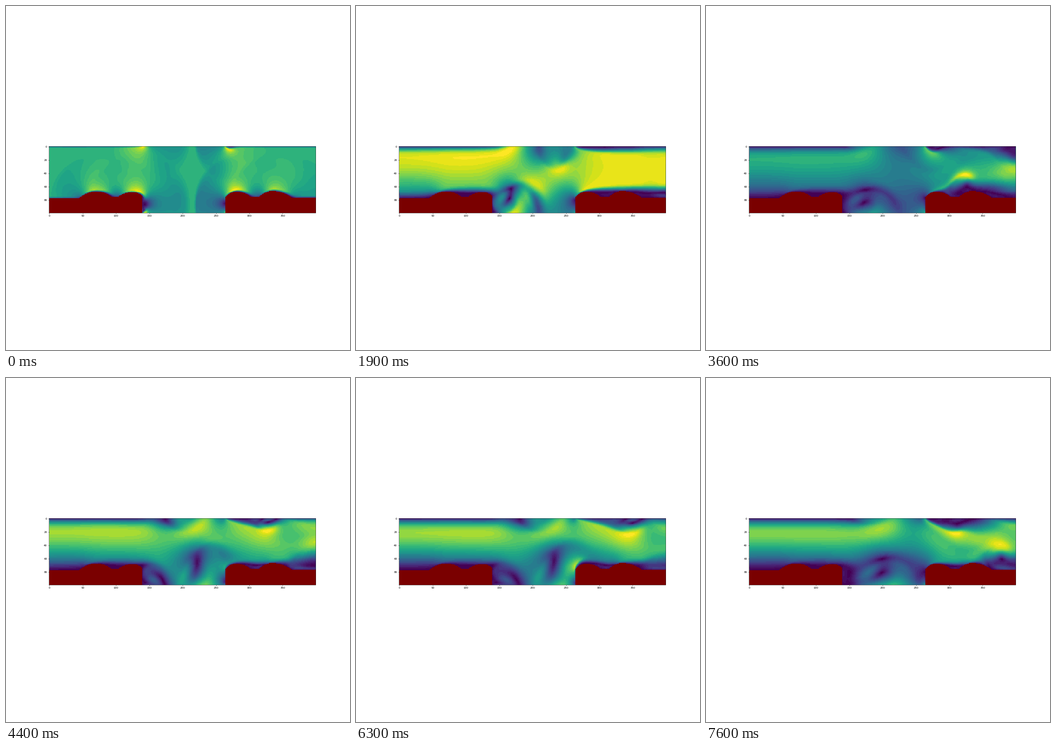
These frames come from a looping animation (748x748 px, 7700 ms). A matplotlib script:

```python
import numpy as np
import matplotlib.pyplot as plt
from matplotlib.animation import FuncAnimation

NX, NY = 400, 100
TAU = 0.53
FRAMES, STEPS = 77, 100
GAP = 139, 264

# D2Q9 directions, clockwise from rest
CX = (0, 0, 1, 1, 1, 0, -1, -1, -1)
CY = (0, 1, 1, 0, -1, -1, -1, 0, 1)
W_AXIS, W_DIAG, W_REST = 1 / 9, 1 / 36, 4 / 9


def hill(x, peak, top, rise, fall):
    """Parabolic hill with its own curvature on each side."""
    return top + np.where(x < peak, rise, fall) * (x - peak) ** 2


def ground():
    """Solid cells: two humped banks with an open gap between them."""
    x = np.arange(NX)
    left = np.minimum(hill(x, 70, 67.6, 0.0152, 0.0152), hill(x, 125, 68.6, 0.0145, 0.03))
    right = np.minimum(hill(x, 280, 68, 0.03, 0.0165), hill(x, 334, 67.1, 0.022, 0.0115))
    left = np.minimum(left, np.where(x < 70, 78, 76))
    right = np.minimum(right, np.where(x > 334, 77, 76))
    surface = np.where(x < GAP[0], left, right)
    surface[GAP[0]:GAP[1]] = NY
    return np.arange(NY)[:, None] >= np.round(surface)


def step(f, fluid, solid, top):
    """One lattice Boltzmann step in place; returns the velocity."""
    f[6:9, :, -1] = f[6:9, :, -2]
    f[2:5, :, 0] = f[2:5, :, 1]
    for i in range(1, 9):
        f[i] = np.roll(f[i], (CY[i], CX[i]), axis=(0, 1))

    east = f[2] + f[3] + f[4]
    west = f[6] + f[7] + f[8]
    rho = east + west + f[0] + f[1] + f[5]
    scale = fluid / rho
    ux = (east - west) * scale
    uy = (f[1] + f[2] + f[8] - f[4] - f[5] - f[6]) * scale

    # bounce back inside the banks
    for i in range(1, 5):
        a, b = f[i, top:], f[i + 4, top:]
        kept = a.copy()
        np.copyto(a, b, where=solid)
        np.copyto(b, kept, where=solid)

    # relax towards equilibrium
    f *= 1 - 1 / TAU
    rho *= 1 / TAU
    base = 1 - 1.5 * (ux * ux + uy * uy)
    f[0] += W_REST * rho * base
    axis, diag = W_AXIS * rho, W_DIAG * rho
    for i, cu, w in ((1, uy, axis), (2, ux + uy, diag), (3, ux, axis), (4, ux - uy, diag)):
        even = cu * cu
        even *= 4.5
        even += base
        even *= w
        odd = cu * w
        odd *= 3
        f[i] += even
        f[i] += odd
        f[i + 4] += even
        f[i + 4] -= odd
    return ux, uy


def simulate(solid):
    """Speed of the flow for each frame."""
    f = np.ones((9, NY, NX), np.float32)
    f[3] = 2.3
    fluid = (~solid).astype(np.float32)
    top = int(np.argmax(solid.any(axis=1)))
    below = solid[top:]
    speeds = []
    step(f, fluid, below, top)
    for _ in range(FRAMES):
        for _ in range(STEPS):
            ux, uy = step(f, fluid, below, top)
        speeds.append(np.hypot(ux, uy))
    return speeds


solid = ground()
speeds = simulate(solid)

plt.rcParams.update({"font.family": "DejaVu Sans", "font.size": 9.45,
                     "axes.linewidth": 0.76})
fig, ax = plt.subplots(figsize=(17, 17), dpi=44)
ax.tick_params(width=0.85, length=3.3, pad=3.3)
ax.spines[:].set_snap(False)
cmap = plt.get_cmap("viridis", 32).copy()
cmap.set_bad("#7a0000")
image = ax.imshow(np.ma.array(speeds[0], mask=solid), cmap=cmap, interpolation="nearest")


def draw(i):
    image.set_data(np.ma.array(speeds[i], mask=solid))
    image.set_clim(0, speeds[i].max())
    return [image]


anim = FuncAnimation(fig, draw, frames=FRAMES, interval=100, repeat=True, repeat_delay=0)
plt.show()
```
